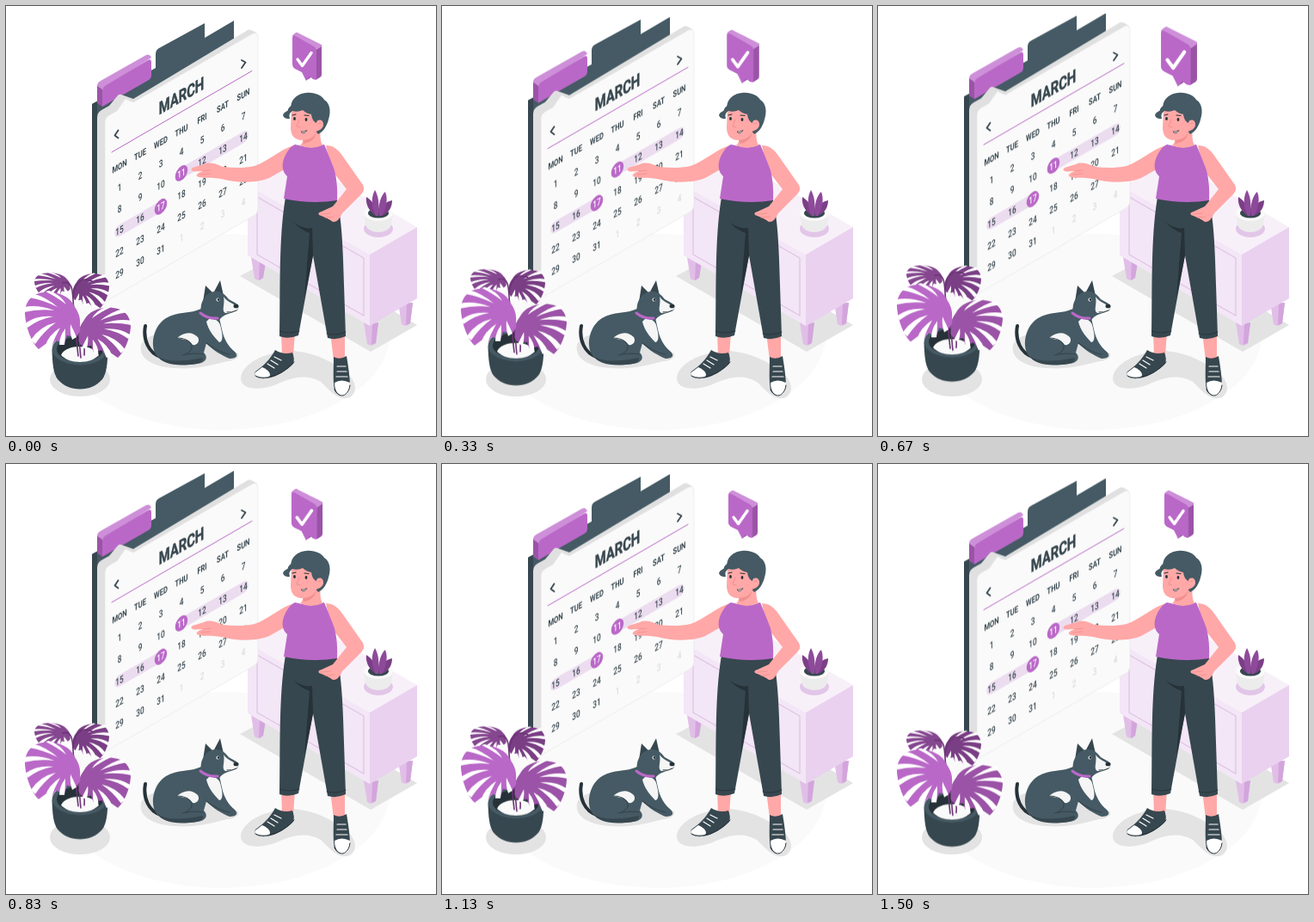
An HTML page without scripts that plays this animation: 500x500 px, repeating every 1.54 s.

```html
<!DOCTYPE html>
<html lang="en">
<head>
<meta charset="utf-8">
<title>Calendar planning</title>
<style>
  html, body { margin: 0; width: 100%; height: 100%; overflow: hidden; background: #fff; }
  svg { display: block; width: 100vw; height: 100vh; }
  .float { animation: float 1.54s linear infinite; }
  .beat { animation: beat 1.54s ease-in-out infinite; transform-origin: 350px 58.7px; }
  @keyframes float { 50% { transform: translateY(-10px); } }
  @keyframes beat {
    0%, 28%, 33%, 68%, 100% { transform: scale(1); }
    14% { transform: scale(1.235); }
    43% { transform: scale(1.235); animation-timing-function: ease; }
  }
  .title { font: 700 20.5px Roboto, sans-serif; text-anchor: middle; fill: #37474f; stroke: #37474f; stroke-width: .5; }
  .grid {
    display: grid; grid-template: repeat(6, 25px) / repeat(7, 33.33px);
    font: 500 11.5px/25px Roboto, sans-serif; text-align: center; color: #37474f;
  }
  .grid b { font-weight: 700; font-size: 10.5px; }
  .grid i { font-style: normal; color: #dcdcdc; }
  .grid em { font-style: normal; color: #fff; }
  .line { fill: none; stroke-linecap: round; stroke-linejoin: round; }
  .shade { fill: #e3e3e3; }
  .skin { fill: #ffa8a7; }
  .dark { fill: #37474f; }
  .slate { fill: #455a64; }
  .ink { fill: #263238; }
  .purple { fill: #ba68c8; }
</style>
</head>
<body>
<svg viewBox="0 0 500 500">
  <defs>
    <g id="leaf">
      <path fill="currentColor" d="M58 18C52 4 34-1 22 1 8 2 0 12 0 26 1 42 8 60 16 67L24 61 30 65 36 57 46 60 49 51 58 53Q66 48 64 40C65 30 62 24 58 18Z"/>
      <path fill="#fff" d="M-1 18Q16 15 34 22 16 20-1 24ZM0 37Q14 27 33 29 16 32 3 42ZM7 56Q18 40 36 36 22 46 12 61ZM23 64Q28 50 41 42 34 54 30 67ZM40 62Q40 52 47 43 47 54 46 62ZM8 2Q24 6 38 18 22 10 5 7ZM28-1Q42 4 48 15 38 7 24 0ZM55 56Q52 48 53 38 57 46 60 53Z"/>
    </g>
    <path id="leg" d="M0 0 17 0 14 24Q9 29 4 25Z"/>
  </defs>

  <ellipse cx="251" cy="379" rx="196" ry="114" fill="#fafafa"/>

  <!-- floor shadows -->
  <g class="shade">
    <path d="M272 314 330 283 478 371 424 402Z"/>
    <ellipse cx="86" cy="434" rx="35" ry="20"/>
    <path d="M157 394C162 380 188 378 215 383L270 404Q272 411 258 413C240 417 222 423 195 421 170 419 154 410 157 394Z"/>
    <path d="M273 432C275 416 300 402 332 401 358 402 382 414 400 430Q412 446 400 455C386 460 378 448 366 437 348 427 332 432 312 441 292 448 272 445 273 432Z"/>
  </g>

  <!-- cabinet -->
  <g fill="#e1bee7">
    <use href="#leg" x="285" y="292"/>
    <use href="#leg" x="416" y="368"/>
    <use href="#leg" x="456" y="345"/>
    <path fill="#d3a5dc" d="M295 296 302 298 299 316 294 319ZM426 370 433 368 430 392 425 394ZM466 346 473 345 470 369 465 371Z"/>
  </g>
  <path fill="#f8f0f9" d="M281 208 336 176 478 257 423 289Z"/>
  <path fill="#f3e6f6" d="M281 208 423 289V372L281 290Z"/>
  <path fill="#ead1ef" d="M423 289 478 257V340L423 372Z"/>
  <path fill="none" stroke="#dfc2e5" stroke-width="1.2" d="M292 222 416 293V360L292 289Z"/>

  <!-- potted succulent -->
  <ellipse cx="433" cy="259" rx="17" ry="10" fill="#e2c6e8"/>
  <path fill="#ececec" d="M416 241H450L448 255Q444 263 433 263T418 255Z"/>
  <ellipse cx="433" cy="241" rx="17" ry="9" fill="#fafafa"/>
  <ellipse cx="433" cy="241" rx="12" ry="5.5" fill="#37474f"/>
  <path fill="#7c3f87" d="M430 244C421 238 418 229 419 222 426 226 429 233 431 239ZM436 244C446 241 449 233 449 226 441 227 437 234 436 239Z"/>
  <path fill="#8e4a9a" d="M430 244C424 232 425 221 429 214 434 222 434 234 433 244ZM434 244C432 232 436 220 441 216 445 226 441 238 437 244Z"/>

  <!-- calendar -->
  <g class="float">
    <path class="slate" d="M100 334V114L174 72V56Q174 51 178 49L231 20V37L265 17V200H110V340Z"/>
    <path class="dark" d="M100 334V114L106 111V338Z"/>
    <path fill="#9a54a6" d="M106 92 112 96V117L106 113Z"/>
    <path fill="#ce8fd9" d="M106 93Q106 89 110 87L163 57Q167 55 169 60L112 97Z"/>
    <path class="purple" d="M112 98Q112 95 115 93L165 63Q169 61 169 65V81Q169 84 166 86L112 117Z"/>
    <path fill="#e0e0e0" d="M106 338V130Q106 124 111 121L120 116 130 104Q132 102 134 103L148 108 281 28Q284 26 292 32L115 344Z"/>
    <path fill="#fafafa" stroke="#e4e4e4" stroke-width=".6" d="M115 344V136Q115 130 120 127L129 122 138 109Q139 107 141 109L148 112 287 32Q293 30 293 37V236Q293 241 288 244Z"/>
    <path class="line" stroke="#ba68c8" d="M123 170 286 75.500"/>
    <path class="line" stroke="#37474f" stroke-width="1.800" d="M130.500 144.500 126.500 150.500 130.500 153.500M274 63 278.500 65.500 274 72"/>
    <g transform="matrix(.866 -.5 0 1 132 261)">
      <path class="line" stroke="#ecdcf0" stroke-width="13.500" d="M0 0H55.400M83.100-25H166.300"/>
      <circle class="purple" cx="55.400" r="8.400"/>
      <circle class="purple" cx="83.100" cy="-25" r="8.400"/>
    </g>
    <text class="title" transform="matrix(.72 -.416 0 1 204 111.500)">MARCH</text>
    <g transform="matrix(.72 -.416 0 1 132 186)">
      <foreignObject x="-16.670" y="-12.500" width="234" height="150">
        <div class="grid" xmlns="http://www.w3.org/1999/xhtml">
          <b>MON</b><b>TUE</b><b>WED</b><b>THU</b><b>FRI</b><b>SAT</b><b>SUN</b>
          <span>1</span><span>2</span><span>3</span><span>4</span><span>5</span><span>6</span><span>7</span>
          <span>8</span><span>9</span><span>10</span><em>11</em><span>12</span><span>13</span><span>14</span>
          <span>15</span><span>16</span><em>17</em><span>18</span><span>19</span><span>20</span><span>21</span>
          <span>22</span><span>23</span><span>24</span><span>25</span><span>26</span><span>27</span><span>28</span>
          <span>29</span><span>30</span><span>31</span><i>1</i><i>2</i><i>3</i><i>4</i>
        </div>
      </foreignObject>
    </g>
  </g>

  <!-- monstera -->
  <g class="float">
    <use href="#leaf" color="#85478f" transform="translate(33 310) scale(.65 .42)"/>
    <use href="#leaf" color="#7a3e85" transform="translate(120 311) scale(-.66 .6)"/>
    <path class="dark" d="M53.500 400C54 416 55 427 60 434 67 442 76 445.500 86 445.500S105 442 112 434C117 427 118 416 118.500 400Z"/>
    <ellipse class="slate" cx="86" cy="399" rx="32.500" ry="18.500"/>
    <ellipse class="ink" cx="86" cy="399" rx="27" ry="15"/>
    <path fill="#fafafa" d="M64 406C67 399 76 396 86 396S105 399 108 406C103 411 96 414 86 414S69 411 64 406Z"/>
    <path class="line" stroke="#6b3375" stroke-width="1.600" d="M66 322C80 318 77 338 79 356S82 390 84 407M100 320C82 312 74 332 80 356M72 354C86 352 84 385 87 409M98 366C88 372 92 390 91 406"/>
    <use href="#leaf" color="#9b53a7" transform="translate(145 350) scale(-.94 .88)"/>
    <use href="#leaf" color="#ba68c8" transform="translate(22 332)"/>
  </g>

  <!-- dog -->
  <path class="line" stroke="#263238" stroke-width="4" d="M180 408C166 404 159 388 162 372"/>
  <path class="slate" d="M227 352C215 358 199 355 186 363 172 372 168 391 173 403 179 417 203 418 222 416 232 415 236 409 230 403L233 392C240 400 252 407 260 410 269 410 270 406 266 402 258 396 253 386 251 376L247 358Z"/>
  <path fill="#f5f5f5" d="M236 364C243 363 249 366 250 375 253 386 251 391 248 391 241 384 235 376 233 367ZM199 386C207 379 216 378 223 385 226 390 222 395 217 394 213 388 206 388 199 386Z"/>
  <path class="line" stroke="#37474f" stroke-width="1.200" d="M199 386C211 386 219 393 215 400Q211 405 205 406 219 403 229 405M233 392Q247 403 260 405"/>
  <path class="dark" d="M176 407Q190 417 229 409 230 416 214 417C195 419 181 415 176 407ZM229 344 232 325 241 334 249 319 253 337Z"/>
  <path class="slate" d="M227 358C225 345 231 334 242 332 250 331 255 336 259 341L268 346Q272 350 269 354C260 358 253 358 248 365 240 365 231 363 227 358Z"/>
  <path fill="#f5f5f5" d="M253 338C256 343 264 346 270 350 271 355 262 357 255 357 250 354 255 347 253 338Z"/>
  <ellipse class="ink" cx="267.500" cy="349" rx="3" ry="2.300"/>
  <path class="line" stroke="#263238" d="M257 356Q263 357 268 354"/>
  <circle cx="246.500" cy="341.500" r="2" fill="#fff"/>
  <circle class="ink" cx="247" cy="341.500" r="1.400"/>
  <path class="line" stroke="#ba68c8" stroke-width="3" d="M226 357Q234 364 246 363"/>

  <!-- legs and shoes -->
  <path class="skin" d="M320 380H336L334 407 321 406ZM377 380H394L394 412 381 412Z"/>
  <path class="dark" d="M313 400Q322 406 333 403 336 410 334 416C326 424 316 431 303 433 292 434 287 430 290 425 300 418 307 411 313 400Z"/>
  <path fill="#fff" d="M298 420C307 424 309 429 305 432 293 434 287 430 290 426Z"/>
  <path class="dark" d="M381 408Q388 412 396 407C398 419 400 432 400 443 397 454 386 455 382 447 380 436 381 422 381 408Z"/>
  <path fill="#fff" d="M382 438Q390 433 400 438C400 449 397 453 391 453 385 452 382 446 382 438Z"/>
  <path class="line" stroke="#fff" stroke-width="1.200" d="M312 408 320 412M308 412 316 417M304 416 312 421M385 419H395M385 425H396M384 431H397"/>
  <path class="line" stroke="#263238" d="M290 430C302 437 324 427 335 414M382 446C387 457 398 455 400 441"/>
  <path class="dark" d="M325 222H384C389 240 391 266 392 295L395 384Q384 389 374 386L357 290 340 383Q328 388 318 384C319 329 317 270 325 222Z"/>
  <path class="ink" d="M335 252Q347 260 356 258L357 290 347 340 353 264Q342 260 335 252Z"/>
  <path class="line" stroke="#263238" stroke-width=".8" d="M318.500 378Q328 382 341 378M373 381Q384 384 395 379"/>

  <!-- arms, top, neck -->
  <path class="skin" d="M372 162C384 162 389 171 396 181L415 208Q418 214 413 219L391 241Q386 252 380 251 375 247 364 243 362 240 367 239L380 233 396 213 378 190Z"/>
  <path class="line" stroke="#f28f8f" stroke-width=".8" d="M366 242 378 241M371 246 381 245"/>
  <path class="skin" d="M335 162C320 166 306 180 289 186 275 189 264 188 252 187 244 183 236 181 230 184L217 188Q213 191 219 192.500L229 192Q220 195 222 198C228 201 240 199 250 201 268 206 293 206 306 200L329 187Z"/>
  <path class="line" stroke="#f28f8f" stroke-width=".8" d="M229 192 238 191M227 196 238 195"/>
  <path class="purple" d="M336 161Q354 166 370 161C374 170 378 181 382 191Q386 207 385 226 355 231 323 224L327 198C322 194 320 186 323 178 326 170 330 164 336 161Z"/>
  <path class="skin" d="M346 147 366 142Q364 154 368 162 354 168 342 162Q347 158 346 147Z"/>
  <path fill="#f28f8f" d="M345 155Q355 154 361 146 359 158 346 160Z"/>

  <!-- head -->
  <path class="slate" d="M332 122C329 111 337 102 349 101 359 100 367 104 370 109 377 113 378 123 375 132 373 140 369 146 363 149L345 128Z"/>
  <path class="skin" d="M332 119H357L360 136C363 130 370 132 369 139 367 145 363 144 361 146 358 154 350 156 343 156 334 155 331 149 331 141Z"/>
  <path class="slate" d="M330 131C325 132 320 128 323 125 325 122 328 123 328 120 332 113 346 109 357 116Q364 124 361 136 356 134 355 126 349 125 345 121 339 124 333 122 328 125 330 131Z"/>
  <ellipse class="ink" cx="335.500" cy="131" rx="1.400" ry="2"/>
  <ellipse class="ink" cx="349" cy="132" rx="1.400" ry="2"/>
  <path class="line" stroke="#263238" stroke-width="1.200" d="M333 127 337 126M347 127 352 127.500"/>
  <path class="line" stroke="#f28f8f" d="M341 132 338 140 342 141M363 137 366 136"/>
  <path fill="#fff" stroke="#263238" stroke-width=".7" d="M343 146Q346 147 350 144.500 348 148 345 148Z"/>

  <!-- check bubble -->
  <g class="beat">
    <path fill="#9a54a6" d="M360 48 367 45V80Q367 82 365 83L360 86ZM349 86.500 354 83.500V80L346 78Z"/>
    <path fill="#ce8fd9" d="M333 35Q333 33 338 30.500L365 44Q367 45 367 47L361 51Z"/>
    <path class="purple" d="M333 37Q333 33 337 35L358 47Q361 49 361 52V83Q361 87 357 85L353 82 349 87 344 77 336 73Q333 71 333 68Z"/>
    <path class="line" stroke="#fff" stroke-width="3.400" d="M339 62 344.500 69.500 355 54.500"/>
  </g>
</svg>
</body>
</html>
```
